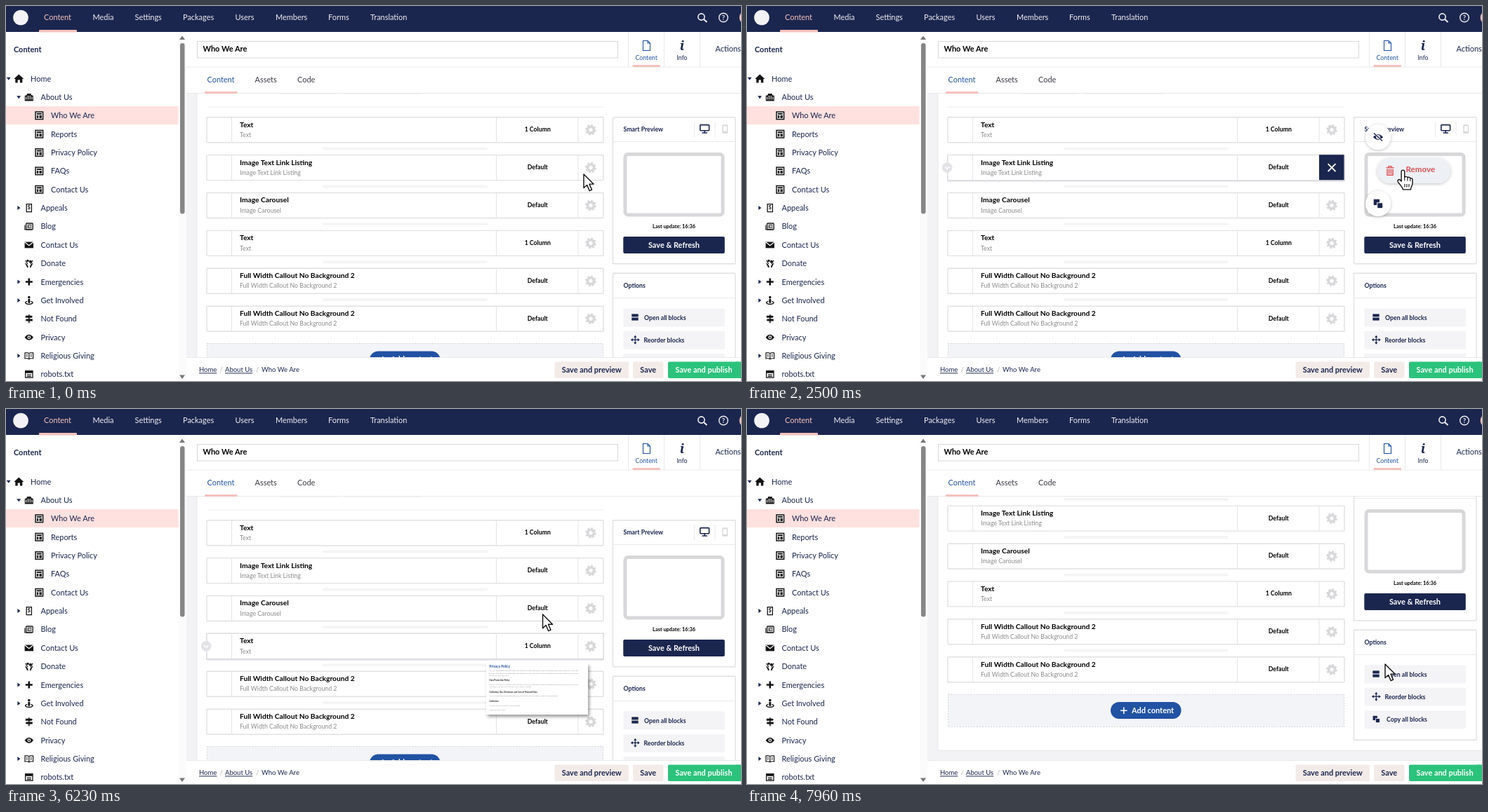
An HTML page for the animation above (8 s loop, 1047 by 535 pixels).

```html
<!DOCTYPE html>
<html lang="en">
<head>
<meta charset="utf-8">
<title>Block editor</title>
<style>
html, body { margin: 0; width: 100%; height: 100%; overflow: hidden; background: #fff; }
svg { display: block; width: 100vw; height: 100vh; font-family: Lato, sans-serif; }
</style>
</head>
<body>
<svg id="stage" viewBox="0 0 1047 535"></svg>
<script>
const NAVY = '#1b264f', BLUE = '#2152a3', PINK = '#f5c1bc', GREY = '#d8d7d9', RED = '#e05257', INK = '#141414';
const PERIOD = 8000, ROW_STEP = 53.9;

// ---- drawing helpers; y of a text is the middle of its capitals
const text = (x, y, s, size = 10.95, fill = NAVY, weight = 400, more = '') =>
  `<text x="${x}" y="${y + size * .36}" font-size="${size}" fill="${fill}" font-weight="${weight}" ${more}>${s}</text>`;
const mid = (x, y, s, size, fill, weight = 700) => text(x, y, s, size, fill, weight, 'text-anchor="middle"');
const rect = (x, y, w, h, fill, r = 0, more = '') =>
  `<rect x="${x}" y="${y}" width="${w}" height="${h}" fill="${fill}" rx="${r}" ${more}/>`;
const box = (x, y, w, h, stroke = '#e1e1e4', r = 1, width = 1.4) =>
  rect(x, y, w, h, '#fff', r, `stroke="${stroke}" stroke-width="${width}"`);
const line = (d, stroke = '#e9e9eb', width = 1, more = '') =>
  `<path d="${d}" fill="none" stroke="${stroke}" stroke-width="${width}" ${more}/>`;
const shape = (d, fill = INK, more = '') => `<path d="${d}" fill="${fill}" ${more}/>`;
const dot = (x, y, r, fill, more = '') => `<circle cx="${x}" cy="${y}" r="${r}" fill="${fill}" ${more}/>`;
const at = (x, y, body, more = '') => `<g transform="translate(${x} ${y})" ${more}>${body}</g>`;

const gear = color =>
  `<g fill="none" stroke="${color}"><circle r="4.5" stroke-width="3.4"/>` +
  `<circle r="6.6" stroke-width="2.4" stroke-dasharray="2.9 2.284"/></g>`;
const copyIcon = (k = 1) => `<g transform="scale(${k})">` + rect(-6.3, -6.3, 8.3, 8.3, NAVY) +
  rect(-1.3, -1.3, 8, 8, NAVY, 0, 'stroke="#fff" stroke-width="1"') + '</g>';

const icons = {
  home: shape('M-7 .3 0-6.2 7 .3H5V6H1.6V1.8H-1.6V6H-5V.3Z'),
  building: shape('M-6-2 -3-3V-5H3V-3L6-2V5.5H-6Z') + line('M-4.2-.5V3.5M-1.4-2V3.5M1.4-2V3.5M4.2-.5V3.5', '#fff', 1.1),
  page: box(-5.3, -5.3, 10.6, 10.6, INK, 0, 1.5) + rect(-3.5, -3.5, 7, 2, INK) + rect(-3.5, -.4, 2.4, 4, INK) + rect(.2, -.4, 3.4, 4, INK),
  appeal: box(-3.6, -5.5, 7.2, 11, INK, 0, 1.3) + mid(0, -.8, '$', 7, INK),
  news: box(-4.2, -4.5, 9.6, 9, INK, 1, 1.3) + line('M-6-2V4.5H4M-2.4-2.2H3.8M1-.2H3.8M-2.4 2H3.8', INK, 1.1) + rect(-2.4, -.9, 2.4, 1.8, INK),
  mail: rect(-6.2, -4.3, 12.4, 8.8, INK) + line('M-6.2-4 0 1 6.2-4', '#fff', 1.2),
  donate: shape('M-5.5-1.5C-4.5 1-1.5 1-1 5.8H-3C-3 3-5.5 2.5-5.5-1.5ZM5.5-1.5C4.5 1 1.5 1 1 5.8H3C3 3 5.5 2.5 5.5-1.5Z') +
    dot(-1.8, -3.8, 1.7, INK) + dot(2, -2.4, 2, INK) + line('M-5-4.5-2 1M5.2-4.5 2.2 1', INK, 1.2),
  plus: line('M-5 0H5M0-5V5', INK, 2.6),
  person: dot(0, -4.4, 1.8, INK) + rect(-1.5, -2.2, 3, 6, INK, 1) + line('M-2.6 1.4C-8 3 -4 5.6 0 5.6S8 3 2.6 1.4', INK, 1.4),
  sign: line('M0-6V6', INK, 1.6) + shape('M-5-4.6H3.6L5.2-3.1 3.6-1.6H-5ZM5 .2H-3.6L-5.2 1.7-3.6 3.2H5Z'),
  eye: shape('M-6.2 0Q0-8 6.2 0 0 8-6.2 0Z') + dot(0, 0, 2.4, '#fff') + dot(0, 0, 1.2, INK),
  book: line('M0-3.4C-2-5-4-4.6-5.8-4.2V4C-4 3.6-2 3.4 0 4.8 2 3.4 4 3.6 5.8 4V-4.2C4-4.6 2-5 0-3.4V4.8M-4-2H-2M-4 .4H-2M4-2H2M4 .4H2', INK, 1.2),
  robots: box(-5.2, -4.8, 10.4, 9.6, INK, 0, 1.3) + rect(-5, -4.6, 10, 3, INK) + line('M-3 .8H3M-3 3H3', INK, 1.3)
};

// ---- header bar
function header() {
  const items = [[54, 'Content'], [123.5, 'Media'], [183.5, 'Settings'], [252, 'Packages'],
    [326.5, 'Users'], [384, 'Members'], [459, 'Forms'], [519, 'Translation']];
  return rect(0, 0, 1047, 37, NAVY) + dot(21, 16.5, 10.8, '#f3f3f6') +
    items.map(([x, s], i) => text(x, 16, s, 10.95, i ? '#eeeef2' : PINK)).join('') +
    rect(47, 34, 54, 3.5, PINK, 1) +
    `<circle cx="990.5" cy="15.5" r="4.6" fill="none" stroke="#f0f0f3" stroke-width="1.6"/>` + line('M994 19 998.5 23', '#f0f0f3', 2) +
    `<circle cx="1022" cy="16.5" r="6.3" fill="none" stroke="#f0f0f3" stroke-width="1.4"/>` + mid(1022, 16.7, '?', 9.5, '#f0f0f3') +
    dot(1055, 16.5, 10.3, PINK);
}

// ---- content tree: label, icon, depth, caret
function tree() {
  const nodes = [['Home', 'home', 0, 'v'], ['About Us', 'building', 1, 'v'], ['Who We Are', 'page', 2], ['Reports', 'page', 2],
    ['Privacy Policy', 'page', 2], ['FAQs', 'page', 2], ['Contact Us', 'page', 2], ['Appeals', 'appeal', 1, '&gt;'],
    ['Blog', 'news', 1], ['Contact Us', 'mail', 1], ['Donate', 'donate', 1], ['Emergencies', 'plus', 1, '&gt;'],
    ['Get Involved', 'person', 1, '&gt;'], ['Not Found', 'sign', 1], ['Privacy', 'eye', 1],
    ['Religious Giving', 'book', 1, '&gt;'], ['robots.txt', 'robots', 1]];
  const rows = nodes.map(([label, icon, depth, caret], i) => {
    const y = 103.6 + 26.36 * i, x = 18.3 + 14.5 * depth;
    const mark = caret === 'v' ? 'M-3-1.8H3L0 2.2Z' : 'M-1.8-3V3L2.2 0Z';
    return at(x, y, icons[icon]) + text(x + 16.7, y, label) + (caret ? at(x - 14.6, y, shape(mark, NAVY)) : '');
  });
  return rect(0, 37, 257, 498, '#fff') + rect(0, 143, 245.5, 26, '#ffe1df') +
    text(11, 62.5, 'Content', 10.95, NAVY, 700) + rows.join('') +
    rect(246, 37, 11, 498, '#fbfbfb') + rect(248, 53, 6.5, 243.5, '#868686', 3.2) +
    shape('M247 48 251 42.5 255 48ZM247 526.5 251 532 255 526.5Z', '#777');
}

// ---- title, apps and tabs
function editorHead() {
  const tabs = [[286.5, 'Content'], [354.5, 'Assets'], [415, 'Code']];
  return rect(257, 37, 790, 88, '#fff') + box(272.5, 50.5, 599, 23.5, GREY, 0, 1) + text(280.5, 61, 'Who We Are', 10.95, '#000', 700) +
    line('M257 87H1047M257 124.5H1047M886.5 37V87M937.5 37V87M988.5 37V87') +
    line('M907.5 49.5H914L917.5 53V63.5H907.5ZM914 49.5V53H917.5', BLUE, 1.1) + mid(912.2, 73.5, 'Content', 8.76, BLUE, 400) +
    `<text x="963" y="63" font-family="'Noto Serif', serif" font-size="18" font-weight="700" font-style="italic" fill="${NAVY}" text-anchor="middle">i</text>` +
    mid(963, 73.5, 'Info', 8.76, NAVY, 400) + text(1010.5, 61.5, 'Actions') + rect(892.5, 84, 39.5, 3, PINK, 1) +
    tabs.map(([x, s], i) => text(x, 105.5, s, 10.95, i ? '#3a3a44' : BLUE)).join('') + rect(283, 122, 46.5, 3, PINK, 1);
}

function block(title, layout, i) {
  const y = 158.7 + ROW_STEP * i;
  const halo = rect(285, y - .8, 567, 38.8, '#bcbcc6', 2, 'opacity=".55"');
  const chevron = dot(285.2, y + 18, 7.3, '#e3e3e7') + line(`M282 ${y + 16.6}L285.2 ${y + 19.8} 288.4 ${y + 16.6}`, '#fff', 1.6);
  return `<g id="halo${i}">${halo}</g>` + box(286, y, 565, 36) +
    line(`M321.5 ${y}V${y + 36}M698.5 ${y}V${y + 36}M815 ${y}V${y + 36}`, '#e4e4e7') +
    text(333, y + 10.3, title, 10.22, '#000', 700) + text(333, y + 25, title, 8.76, '#8b8b8f') +
    mid(757.3, y + 17.3, layout, 8.76, '#000') + at(833, y + 18, gear(GREY)) +
    `<g id="chevron${i}">${chevron}</g>`;
}

function blockList() {
  const wide = 'Full Width Callout No Background 2';
  const blocks = [['Text', '1 Column'], ['Image Text Link Listing', 'Default'], ['Image Carousel', 'Default'],
    ['Text', '1 Column'], [wide, 'Default'], [wide, 'Default']];
  let gaps = '';
  for (let i = 0; i < 5; i++) gaps += rect(451, 201.5 + ROW_STEP * i, 235, 4, '#f5f5f6', 2);
  return rect(272, 60, 800, 501.5, '#fff', 2, 'stroke="#e8e8ea"') +
    rect(392, 123.5, 80, 2, '#e6e6e9') + rect(482, 123.5, 111, 2, '#e6e6e9') + line('M287 144H851', '#ececee') +
    gaps + blocks.map(([a, b], i) => block(a, b, i)).join('') +
    rect(286.5, 481.5, 564, 46.5, '#f3f4f8', 0, 'stroke="#d5d5da" stroke-dasharray="2 2"') +
    rect(518, 492.5, 100.5, 24, BLUE, 12) + line('M532 504.7H541.5M536.75 500V509.5', '#fff', 1.6) +
    text(548, 504.5, 'Add content', 10.95, '#fff', 700);
}

function sidePanel() {
  const option = (y, x, label, icon) => rect(879.5, y - 13, 144.5, 26, '#f4f3f5', 2) + at(896.3, y - .5, icon) + text(x, y, label, 8.76, NAVY, 700);
  const bars = rect(-5, -4.6, 9.4, 4, NAVY) + rect(-5, .6, 9.4, 4, NAVY);
  const cross = line('M-4.5 0H4.5M0-4.5V4.5', NAVY, 1.2) + shape('M0-6.5-2.2-3.5H2.2ZM0 6.5-2.2 3.5H2.2ZM-6.5 0-3.5-2.2V2.2ZM6.5 0 3.5-2.2V2.2Z', NAVY);
  return box(864.5, 158.7, 174.5, 209) + line('M864.5 193.5H1039M980.5 166V187M1010 166V187') +
    text(879.5, 175.7, 'Smart Preview', 8.76, NAVY, 700) +
    box(988.8, 169.6, 12.8, 8.2, NAVY, 1, 1.6) + line('M995.2 178V180.5M991.5 181H999', NAVY, 1.6) +
    rect(1020.2, 169.3, 8, 12.4, GREY, 1.5) + rect(1021.6, 171.2, 5.2, 7.6, '#fff') +
    box(882, 211.5, 139, 86.5, GREY, 4, 5) +
    mid(951.6, 314.5, 'Last update: 16:36', 7.4, '#000') + rect(879.3, 329, 144.5, 24, NAVY, 2) + mid(951.5, 340.8, 'Save &amp; Refresh', 10.95, '#fff') +
    box(864.5, 381.2, 174.5, 157) + line('M864.5 416.5H1039') + text(879.5, 398.6, 'Options', 8.76, NAVY, 700) +
    option(444.5, 909, 'Open all blocks', bars) + option(476.7, 908.5, 'Reorder blocks', cross) + option(509, 911, 'Copy all blocks', copyIcon(.75));
}

function footer() {
  const button = (x, w, label, fill, color) => rect(x, 507.5, w, 23.5, fill, 2) + mid(x + w / 2, 519, label, 10.95, color);
  const under = 'text-decoration="underline"';
  return rect(257, 501, 790, 34, '#fff') + line('M257 501.5H1047') +
    text(275, 519, 'Home', 9.5, NAVY, 400, under) + text(304.5, 519, '/', 9.5, '#aaa') + text(312, 519, 'About Us', 9.5, NAVY, 400, under) +
    text(356, 519, '/', 9.5, '#aaa') + text(364, 519, 'Who We Are', 9.5) +
    button(781.5, 105.5, 'Save and preview', '#f3ebe8', NAVY) + button(893, 43.5, 'Save', '#f3ebe8', NAVY) +
    button(943, 102, 'Save and publish', '#2bc37c', '#fff') + rect(1040, 507.5, 7, 23.5, '#2bc37c');
}

function previewCard() {
  const small = (y, s) => text(688.5, y, s, 2.5, '#8a8a90');
  const head = (y, s) => text(688.5, y, s, 2.9, '#222', 700);
  const filler = 'We are committed to looking after the details that you share with us and to keeping them safe, and we say here how';
  return rect(684, 363, 145, 73, '#fff', 0, 'filter="url(#cardShadow)"') +
    text(688.5, 367, 'Privacy Policy', 4.8, BLUE, 700) + small(373.5, filler) + small(377, filler) + small(380.3, 'details are held and used.') +
    head(387, 'Data Protection Policy') + small(393, filler) + small(396.5, 'the details you give are kept only for as long as needed') +
    head(403.5, 'Collection, Use, Disclosure and Care of Personal Data') + small(409.5, filler.slice(0, 88)) +
    head(417, 'Collection') + small(422.8, 'It is our policy to ask only what we need') + small(429, 'There are other ways');
}

// ---- fly-out actions
const actions = [
  { x: 899, y: 187, label: 'Hide', color: NAVY, on: 1780, off: 2290,
    icon: shape('M-7 0Q0-8 7 0 0 8-7 0Z', NAVY) + dot(0, 0, 2.9, '#fff') + dot(0, 0, 1.5, NAVY) + line('M-5.5-5.5 5.5 5.5', '#fff', 3) + line('M-6-5.5 6 5.5', NAVY, 1.5) },
  { x: 916, y: 235, label: 'Remove', color: RED, on: 2330, off: 3110,
    icon: line('M-5.5-4.4H5.5M-2-4.6V-6.4H2V-4.6', RED, 1.4) + line('M-4-2.5V6.2H4V-2.5M-1.4-2.5V4.5M1.4-2.5V4.5', RED, 1.5) },
  { x: 899, y: 282, label: 'Copy', color: NAVY, on: 3180, off: 3970, icon: copyIcon() }
];
const actionMarkup = ({ label, color, icon }, i) =>
  `<g id="action${i}"><rect id="pill${i}" x="-18" y="-18" height="36" rx="18" filter="url(#soft)"/>${icon}` +
  `<g id="label${i}">${text(22.5, -1.7, label, 11.6, color, 700)}</g></g>`;

const arrow = shape('M0 0V19.6L4.6 15.4 8.2 23.6 11.5 22.1 8 14.1H14Z', '#fff', 'stroke="#111" stroke-width="1.4" stroke-linejoin="round"');
const hand = shape('M-2.3 2A2.3 2.3 0 0 1 2.3 2V10C3.3 8.4 6.2 8.8 6.6 10.6 7.8 9.4 10 9.9 10.4 11.6 11.8 10.8 13.6 11.6 13.6 13.6V18C13.6 22.5 11 23.5 11 27.5H0C-.4 24-4 21-7 16.7-8.4 14.3-5.8 12.2-4 13.9L-2.3 15.6Z',
  '#fff', 'stroke="#111" stroke-width="1.4" stroke-linejoin="round"') + line('M2.3 10V14.5M6.6 11V15M10.4 12V15.5M2.5 19.5V24M5.5 19.5V24M8.5 19.5V24', '#111', 1.1);

document.getElementById('stage').innerHTML = `<defs>
  <clipPath id="view"><rect x="257" y="125" width="790" height="376.5"/></clipPath>
  <filter id="soft" x="-30%" y="-30%" width="160%" height="170%"><feDropShadow dx="0" dy="1" stdDeviation="2" flood-color="#000" flood-opacity=".25"/></filter>
  <filter id="cardShadow" x="-10%" y="-10%" width="120%" height="130%"><feDropShadow dx="2" dy="3" stdDeviation="2" flood-color="#000" flood-opacity=".4"/></filter>
  </defs>` + rect(0, 0, 1047, 535, '#fff') + rect(257, 125, 790, 377, '#f3f2f4') +
  `<g clip-path="url(#view)"><g id="list">${blockList()}</g><g id="side">${sidePanel()}</g></g>` +
  editorHead() + tree() + header() + footer() +
  `<g id="gearHover">${at(833, 230.6, gear(NAVY))}</g>` + actions.map(actionMarkup).join('') +
  `<g id="close">${rect(815, 212.2, 35.5, 36, NAVY)}${line('M827.6 225.2 838.4 236M838.4 225.2 827.6 236', '#fff', 1.8)}</g>` +
  `<g id="card">${previewCard()}</g><g id="cursor"><g id="arrow">${arrow}</g><g id="hand">${hand}</g></g>`;

// ---- motion
const el = {};
document.querySelectorAll('g[id], rect[id]').forEach(n => el[n.id] = n);
const clamp = v => Math.max(0, Math.min(1, v));
const ramp = (t, a, b) => clamp((t - a) / (b - a));
const easeOut = p => 1 - (1 - p) * (1 - p);
const during = (t, on, off, fade = 150) => ramp(t, on, on + fade) - ramp(t, off, off + fade);
const fadeTo = (n, v) => { n.setAttribute('opacity', v); n.style.display = v > 0 ? '' : 'none'; };
const move = (n, x, y, k = 1) => n.setAttribute('transform', `translate(${x} ${y}) scale(${k})`);

// start, end, x, y of each pointer move
const moves = [[30, 230, 828, 238], [1600, 2060, 912, 186], [2230, 2630, 937, 240], [3060, 3360, 891, 279.5],
  [3930, 4300, 831, 235], [4850, 5160, 758, 328], [6200, 6230, 764, 293], [6230, 6600, 871, 307], [7700, 7960, 909, 364]];
const handTimes = [[30, 1667], [1780, 2290], [2330, 3110], [3180, 3970], [4050, 4880]];
const hovers = { 1: [30, 4900], 2: [6250, 6540], 3: [5040, 6240] };

function pointer(t) {
  let x = 823, y = 240;
  for (const [a, b, toX, toY] of moves) {
    const p = easeOut(ramp(t, a, b));
    x += (toX - x) * p;
    y += (toY - y) * p;
  }
  return [x, y];
}

function update(t) {
  const scroll = 74.5 * ramp(t, 6930, 7230);
  move(el.list, 0, -scroll);
  move(el.side, 0, -Math.min(scroll, 66));
  for (let i = 0; i < 6; i++) {
    const v = hovers[i] ? during(t, ...hovers[i]) : 0;
    fadeTo(el['halo' + i], v);
    fadeTo(el['chevron' + i], v);
  }
  fadeTo(el.gearHover, during(t, 30, 4850));
  fadeTo(el.close, during(t, 940, 4700, 120));

  actions.forEach((a, i) => {
    const out = easeOut(ramp(t, 930 + 20 * i, 1190 + 20 * i)) * (1 - easeOut(ramp(t, 4710, 4960)));
    const open = easeOut(during(t, a.on, a.off, 160));
    move(el['action' + i], 833 + (a.x - 833) * out, 230.5 + (a.y - 230.5) * out, .3 + .7 * out);
    fadeTo(el['action' + i], clamp(out * 2));
    el['pill' + i].setAttribute('width', 36 + 68 * open);
    el['pill' + i].setAttribute('fill', open > .05 ? '#edf0f4' : '#fff');
    fadeTo(el['label' + i], clamp(open * 2 - 1));
  });

  fadeTo(el.card, during(t, 5110, 6240));
  move(el.cursor, ...pointer(t));
  const pointing = handTimes.some(([a, b]) => t >= a && t < b);
  fadeTo(el.hand, +pointing);
  fadeTo(el.arrow, +!pointing);
}

const start = performance.now();
function frame() {
  update((performance.now() - start) % PERIOD);
  requestAnimationFrame(frame);
}
frame();
</script>
</body>
</html>
```
